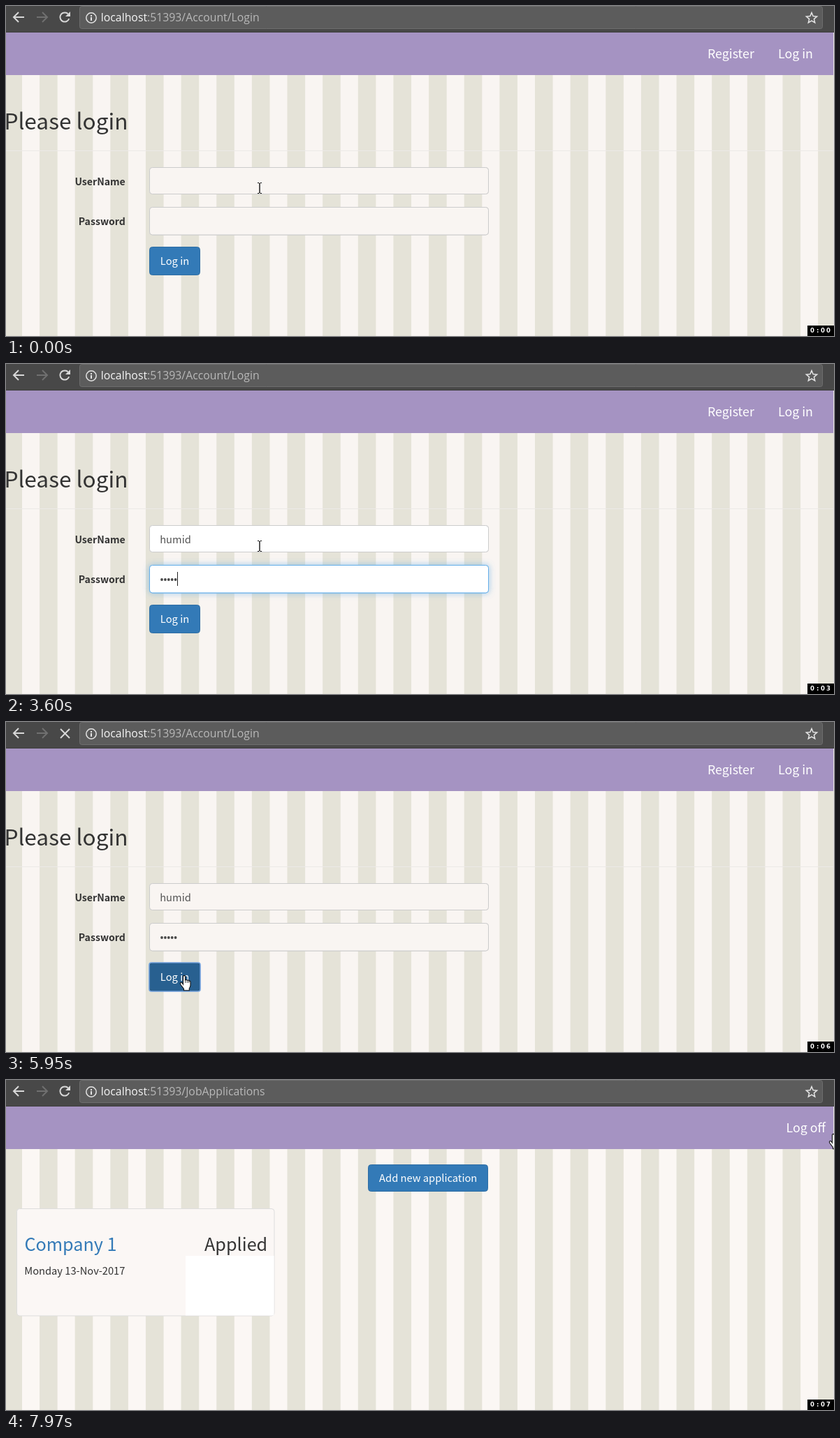
An HTML page with a canvas for the animation above (8 s loop, 1185 by 473 pixels).

```html
<!DOCTYPE html>
<html lang="en">
<head>
<meta charset="utf-8">
<title>Login demo</title>
<style>
html, body { margin: 0; width: 100%; height: 100%; overflow: hidden; }
canvas { display: block; width: 1185px; height: 473px; }
</style>
</head>
<body>
<canvas id="stage" width="1185" height="473"></canvas>
<script>
const ctx = document.getElementById('stage').getContext('2d');
const W = 1185, H = 473, LOOP = 8000;
const PAGE_FONT = '"Noto Sans CJK JP", "Noto Sans CJK SC", "Noto Sans CJK KR", "Noto Sans CJK TC", "Open Sans", sans-serif';
const BAR_FONT = '"Open Sans", "Noto Sans", sans-serif';
const BODY = 14.7, LABEL = 14.1, NAV = 17.8, H2 = 31.6, H3 = 25.2, URL_SIZE = 15.8;
const BLUE = '#337ab7', INK = '#333';
const USER = 'humid';
const DOT_STEP = 4.9;

// Moments at which each item advances by one
const SECONDS = [1080, 2040, 3030, 4000, 5010, 5950, 7030];
const USER_KEYS = [1200, 1480, 1640, 1790, 1940];
const PASS_KEYS = [2590, 3180, 3330, 3480, 3600];

const CURSOR = [
  [0, 'beam', 363, 253],
  [4280, 'none', 0, 0],
  [4420, 'arrow', 322, 385],
  [4540, 'arrow', 251, 450],
  [4660, 'arrow', 252, 410],
  [4770, 'hand', 255, 363],
  [7310, 'arrow', 257, 360],
  [7430, 'arrow', 454, 252],
  [7580, 'none', 0, 0],
  [7730, 'arrow', 977, 80],
  [7850, 'arrow', 1100, 53],
  [7970, 'hand', 1184, 77]
];

const passed = (times, t) => times.filter(time => t >= time).length;
const within = (t, from, to) => t >= from && t < to;

function rect(x, y, w, h, color) {
  ctx.fillStyle = color;
  ctx.fillRect(x, y, w, h);
}

function box(x, y, w, h, fill, stroke, radius = 4) {
  ctx.beginPath();
  ctx.roundRect(x, y, w, h, radius);
  ctx.fillStyle = fill;
  ctx.fill();
  ctx.strokeStyle = stroke;
  ctx.lineWidth = 1;
  ctx.stroke();
}

function text(str, x, y, size, color, { align = 'left', weight = 400, font = PAGE_FONT } = {}) {
  ctx.font = `${weight} ${size}px ${font}`;
  ctx.textAlign = align;
  ctx.fillStyle = color;
  ctx.fillText(str, x, y);
  return ctx.measureText(str).width;
}

function path(points, color, width = 2, close = false) {
  ctx.beginPath();
  points.forEach(([x, y]) => ctx.lineTo(x, y));
  if (close) ctx.closePath();
  ctx.strokeStyle = color;
  ctx.lineWidth = width;
  ctx.stroke();
}

function arc(x, y, r, color, width, from = 0, to = Math.PI * 2) {
  ctx.beginPath();
  ctx.arc(x, y, r, from, to);
  ctx.strokeStyle = color;
  ctx.lineWidth = width;
  ctx.stroke();
}

function navArrow(x, dir, color) {
  path([[x - dir * 15, 16], [x, 16]], color);
  path([[x - dir * 7, 9], [x, 16], [x - dir * 7, 23]], color);
}

function browserBar(t) {
  const icon = '#d8d8d8';
  rect(0, 0, W, 38, '#484848');
  rect(0, 37, W, 1, '#3e3e3e');
  box(105.5, 0.5, 1063, 32, '#5c5c5c', '#6e6e6e', 3);
  navArrow(11, -1, icon);
  navArrow(59, 1, '#707070');
  if (within(t, 5280, 6070)) {
    path([[78, 10], [91, 23]], icon);
    path([[91, 10], [78, 23]], icon);
  } else {
    arc(84, 16, 6.6, icon, 2, 0.35, 5.5);
    ctx.beginPath();
    ctx.moveTo(92, 8);
    ctx.lineTo(92, 15);
    ctx.lineTo(85, 15);
    ctx.fillStyle = icon;
    ctx.fill();
  }
  arc(122, 17, 7.2, '#e4e4e4', 1.5);
  rect(121, 13, 2, 2, '#e4e4e4');
  rect(121, 16, 2, 5, '#e4e4e4');
  const star = Array.from({ length: 10 }, (_, i) => {
    const r = i % 2 ? 3.6 : 8, a = i * Math.PI / 5 - Math.PI / 2;
    return [1153 + r * Math.cos(a), 17.5 + r * Math.sin(a)];
  });
  path(star, '#e4e4e4', 1.5, true);
  const opts = { font: BAR_FONT };
  const width = text('localhost', 135.8, 22, URL_SIZE, '#f5f5f5', opts);
  const page = t < 6070 ? '/Account/Login' : '/JobApplications';
  text(':51393' + page, 135.8 + width, 22, URL_SIZE, '#b9b9b9', opts);
}

function background(t) {
  rect(0, 0, W, H, t < 6070 ? '#f9f5f2' : '#fbf7f4');
  for (let x = -2.6; x < W; x += 50.64) rect(x, 98, 25.6, H, '#e5e3d8');
  rect(0, 38, W, 61, '#a593c2');
}

function field(y, h, focus, white) {
  const fill = white ? '#fff' : '#f9f5f2';
  const border = focus === 1 ? '#66afe9' : focus ? '#9ac6dc' : '#ccc';
  ctx.save();
  if (focus) {
    ctx.shadowColor = `rgba(102,175,233,${0.6 * focus * focus})`;
    ctx.shadowBlur = 8 * focus;
  }
  box(205.5, y, 485, h, fill, border);
  ctx.restore();
  box(205.5, y, 485, h, fill, border);
}

function loginButton(t) {
  const down = within(t, 5010, 5160), hover = t >= 4770;
  box(205.5, 345.5, 72, 40, down ? '#204d74' : hover ? '#286090' : BLUE, hover ? '#204d74' : '#2e6da4');
  if (t >= 5010) {
    ctx.beginPath();
    ctx.roundRect(205, 345, 73, 41, 3);
    ctx.strokeStyle = '#6e9fdc';
    ctx.lineWidth = 1.6;
    ctx.stroke();
  }
  text('Log in', 241.5, 371, BODY, '#fff', { align: 'center' });
}

function loginPage(t) {
  text('Register', 1004, 75, NAV, '#fff');
  text('Log in', 1105, 75, NAV, '#fff');
  text('Please login', -2.6, 177, H2, INK);
  rect(0, 207, W, 1, '#ece9e7');

  const label = { align: 'right', weight: 700 };
  text('UserName', 170.8, 256.5, LABEL, INK, label);
  text('Password', 170.8, 314, LABEL, INK, label);

  const userFocus = within(t, 680, 2320) ? 1 : within(t, 2320, 2440) ? 0.5 : 0;
  const passFocus = within(t, 2440, 5160) ? 1
    : within(t, 2320, 2440) || within(t, 5160, 5280) ? 0.5 : 0;
  field(231.5, 38, userFocus, within(t, 680, 5280));
  field(288.5, 39.5, passFocus, within(t, 2320, 5280));

  const typed = USER.slice(0, passed(USER_KEYS, t));
  const typedWidth = text(typed, 220.2, 256.5, BODY, '#555');
  const dots = passed(PASS_KEYS, t);
  for (let i = 0; i < dots; i++) {
    ctx.beginPath();
    ctx.arc(223 + i * DOT_STEP, 309, 1.9, 0, Math.PI * 2);
    ctx.fillStyle = '#484848';
    ctx.fill();
  }

  if (within(t, 680, 960) || within(t, 1200, 2320)) {
    rect(Math.round(220.5 + typedWidth), 241, 1, 20, '#222');
  }
  if (within(t, 2320, 4000) || within(t, 4540, 5010)) {
    rect(Math.round(220.5 + dots * DOT_STEP), 298, 1, 20, '#222');
  }
  loginButton(t);
}

function listPage(t) {
  text('Log off', 1116.6, 75, NAV, '#fff');
  box(518.5, 121.5, 171, 38, BLUE, '#2e6da4');
  text('Add new application', 604.2, 146, BODY, '#fff', { align: 'center' });
  box(15.5, 184.5, 368.5, 153.5, '#fbf7f5', '#ddd');
  if (t >= 7430) rect(257, 252, 126.5, 85.5, '#fff');
  text('Company 1', 26.4, 245, H3, BLUE);
  text('Applied', 374.2, 245, H3, INK, { align: 'right' });
  text('Monday 13-Nov-2017', 26.2, 279, BODY, INK);
}

const cursors = {
  none() {},
  beam() {
    path([[-3, 0.5], [-1, 0.5], [0, 1.5], [1, 0.5], [3, 0.5]], '#111', 1);
    path([[0, 1], [0, 15]], '#111', 1.4);
    path([[-3, 15.5], [-1, 15.5], [0, 14.5], [1, 15.5], [3, 15.5]], '#111', 1);
  },
  arrow() {
    outline('M.5.5V15.5L4 12.3L6.3 17.5L8.7 16.5L6.4 11.4H11Z');
  },
  hand() {
    outline('M-1.5 1.5Q0-.8 1.5 1.5V7Q3 5.8 4.3 7.4Q5.8 6.4 6.8 8.2Q8.8 7.6 9 9.8V14.5Q8.6 17 7.3 18.5V21.8H-.5V19.5L-5 13.5Q-6.3 11 -4.6 10.4Q-3 10.2 -1.5 13Z');
    for (const x of [1.7, 4.3, 6.7]) path([[x, 7.6], [x, 11]], '#111', 0.8);
  }
};

function outline(d) {
  const shape = new Path2D(d);
  ctx.fillStyle = '#fff';
  ctx.fill(shape);
  ctx.strokeStyle = '#111';
  ctx.lineWidth = 1.1;
  ctx.stroke(shape);
}

function cursor(t) {
  if (within(t, 5010, 5160)) {
    arc(254, 368, 8.5, '#fff', 1.3);
    arc(254, 368, 7.5, '#1b2c3c', 0.8);
  }
  const [, kind, x, y] = CURSOR[passed(CURSOR.map(c => c[0]), t) - 1];
  ctx.save();
  ctx.translate(x, y);
  cursors[kind]();
  ctx.restore();
}

function clock(t) {
  rect(1147, 458, 38, 15, '#000');
  const slots = [1151, 1160, 1166, 1174];
  [...`0:0${passed(SECONDS, t)}`].forEach((ch, i) =>
    text(ch, slots[i], 468, 8.5, '#fff', { weight: 700, font: '"DejaVu Sans", sans-serif' }));
}

function draw(t) {
  background(t);
  browserBar(t);
  if (t < 6070) loginPage(t);
  else listPage(t);
  rect(1184, 38, 1, H, '#e9e6e6');
  cursor(t);
  clock(t);
}

const start = performance.now();
function frame() {
  draw((performance.now() - start) % LOOP);
  requestAnimationFrame(frame);
}
frame();
</script>
</body>
</html>
```
